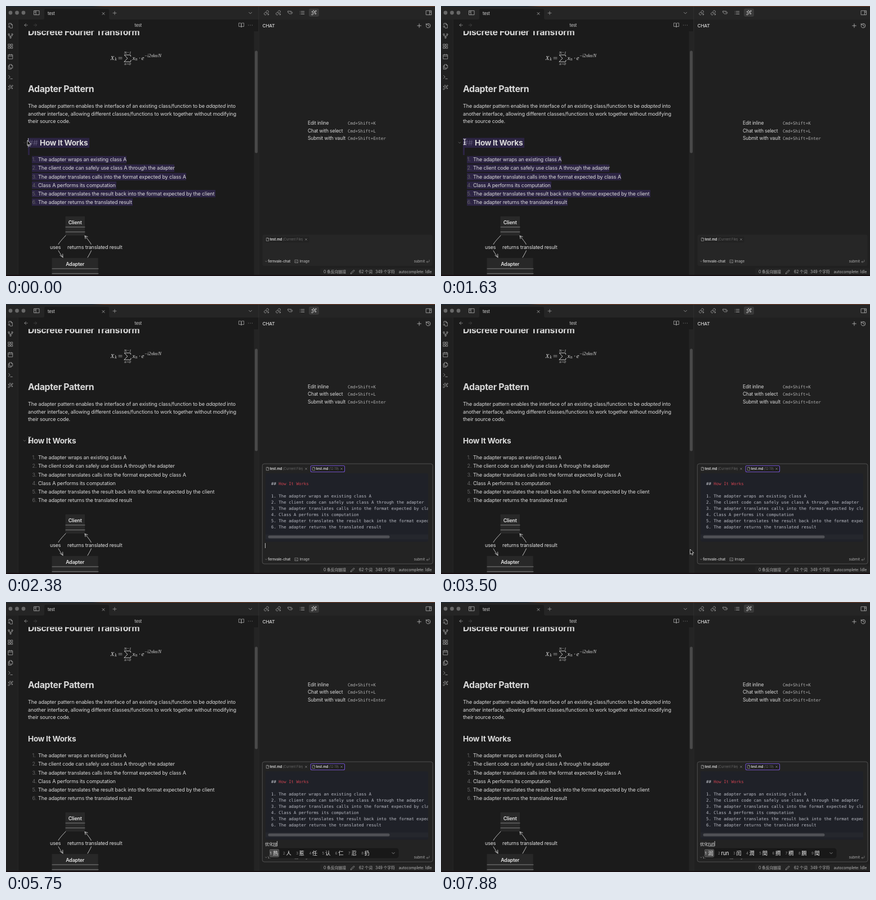
Animation, 762 px wide and 480 px high, one loop 8 s. Source, as an HTML page:

```html
<!DOCTYPE html>
<html lang="zh-CN">
<head>
<meta charset="utf-8">
<style>
html, body { margin: 0; width: 762px; height: 480px; overflow: hidden; background: #1b1b1b; }
svg { display: block; }
text { font-family: Inter, "Noto Sans CJK SC", "Noto Sans CJK", sans-serif; letter-spacing: -.0155em; white-space: pre; }
.h { font-weight: 700; letter-spacing: -.02em; }
.b { font-weight: 600; }
.w { font-weight: 500; }
.m { font-family: "DejaVu Sans Mono", monospace; letter-spacing: 0; }
.s { font-family: "Liberation Serif", serif; font-style: italic; letter-spacing: 0; }
.c { text-anchor: middle; }
.i { fill: none; stroke-linecap: round; stroke-linejoin: round; }
</style>
</head>
<body>
<svg id="stage" width="762" height="480" viewBox="0 0 762 480"></svg>
<script>
const ink = '#dadada';
const text = (s, x, y, size, fill = ink, cls = '', id = '') =>
  `<text id="${id}" x="${x}" y="${y}" font-size="${size}" fill="${fill}" class="${cls}">${s}</text>`;
const rect = (x, y, w, h, fill, more = '') =>
  `<rect x="${x}" y="${y}" width="${w}" height="${h}" fill="${fill}" ${more}/>`;
const line = (d, color = '#bbb', width = 1) => `<path class="i" d="${d}" stroke="${color}" stroke-width="${width}"/>`;
const group = (id, body) => `<g id="${id}">${body}</g>`;

// Icons live on a 24 unit grid and are placed by their centre.
const icons = {
  link: 'M10 13a5 5 0 0 0 7.5.5l3-3a5 5 0 0 0-7-7l-1.7 1.7M14 11a5 5 0 0 0-7.5-.5l-3 3a5 5 0 0 0 7 7l1.7-1.7M17 19h5M20 16l2 3-2 3',
  tags: 'M2 5h8l7 7-6 6-9-7zM13 5h2l7 7-6 6M6 9h.01',
  list: 'M8 6h13M8 12h13M8 18h13M3 6h.01M3 12h.01M3 18h.01',
  wand: 'M21.6 3.6l-1.2-1.2a1.2 1.2 0 0 0-1.8 0L2.4 18.6a1.2 1.2 0 0 0 0 1.8l1.2 1.2a1.2 1.2 0 0 0 1.8 0L21.6 5.4a1.2 1.2 0 0 0 0-1.8M14 7l3 3M5 6v4M19 14v4M10 2v2M7 8H3M21 16h-4M11 3H9',
  down: 'M6 9l6 6 6-6',
  close: 'M18 6 6 18M6 6l12 12',
  plus: 'M12 4v16M4 12h16',
  left: 'M19 12H5M12 19l-7-7 7-7',
  right: 'M5 12h14M12 5l7 7-7 7',
  book: 'M2 3h6a4 4 0 0 1 4 4v14a3 3 0 0 0-3-3H2zM22 3h-6a4 4 0 0 0-4 4v14a3 3 0 0 1 3-3h7z',
  dots: 'M12 12h.01M20 12h.01M4 12h.01',
  history: 'M3 12a9 9 0 1 0 9-9 9.7 9.7 0 0 0-6.7 2.7L3 8M3 3v5h5M12 7v5l4 2',
  panel: 'M2 4h20v16H2zM9 4v16M5 8h1M5 11h1',
  panelRight: 'M2 4h20v16H2zM15 4v16M18 8h1M18 11h1',
  find: 'M5 9V2h9l6 6v14h-9M14 2v6h6M9 16a3 3 0 1 0-6 0 3 3 0 1 0 6 0M8 18l3 3',
  fork: 'M8 5a3 3 0 1 0-6 0 3 3 0 1 0 6 0M22 5a3 3 0 1 0-6 0 3 3 0 1 0 6 0M15 19a3 3 0 1 0-6 0 3 3 0 1 0 6 0M5 8v4h14V8M12 12v4',
  grid: 'M3 3h7v7H3zM14 3h7v7h-7zM14 14h7v7h-7zM3 14h7v7H3z',
  calendar: 'M3 4h18v18H3zM16 2v4M8 2v4M3 10h18',
  copy: 'M8 2h8l5 5v10H8zM16 2v5h5M8 7H3v15h12v-5',
  terminal: 'M4 17l6-6-6-6M12 19h8',
  pencil: 'M17 3a2.8 2.8 0 1 1 4 4L7.5 20.5 2 22l1.5-5.5z',
  enter: 'M9 10l-5 5 5 5M20 4v7a4 4 0 0 1-4 4H4',
  image: 'M3 3h18v18H3zM3 17l6-6 10 10M16 8h.01',
  file: 'M15 2H4v20h16V7zM14 2v6h6'
};
const icon = (name, x, y, size = 10, color = '#a0a0a0', width = 2) =>
  `<g transform="translate(${x - size / 2} ${y - size / 2}) scale(${size / 24})">${line(icons[name], color, width)}</g>`;

const main = '#1b1b1b', side = '#202020';
const steps = [
  'The adapter wraps an existing class A',
  'The client code can safely use class A through the adapter',
  'The adapter translates calls into the format expected by class A',
  'Class A performs its computation',
  'The adapter translates the result back into the format expected by the client',
  'The adapter returns the translated result'
];
const stepEnds = [214, 299, 320, 196, 372, 225];
const stepY = i => 276.4 + i * 15.08;

const frameParts = () =>
  rect(0, 0, 762, 480, main) + rect(0, 0, 762, 24, '#252525') +
  rect(0, 24, 21, 456, side) + rect(449, 24, 313, 456, side) +
  rect(21, 24, .6, 456, '#303030') + rect(448.5, 0, .8, 480, '#343434') +
  `<path d="M65 24q3 0 3-3V8q0-3 3-3h109q3 0 3 3v13q0 3 3 3z" fill="${main}"/>` +
  rect(538, 4.5, 18, 14.5, '#393939', 'rx="3"') +
  [8, 19.5, 31].map(x => `<circle cx="${x}" cy="12" r="3.4" fill="#686868"/>`).join('') +
  icon('panel', 54.5, 12, 11) + icon('close', 173, 13.5, 8, '#ccc') + icon('plus', 193, 12.5, 9) +
  icon('down', 434, 12.5, 10) + icon('link', 462.5, 12) + icon('link', 483.5, 12) + icon('tags', 505, 12) +
  icon('list', 526, 12) + icon('wand', 547, 12, 10, '#ddd') + icon('panelRight', 751, 12, 11) +
  text('test', 74, 16.3, 7.5) +
  ['find', 'fork', 'grid', 'calendar', 'copy', 'terminal', 'wand'].map((n, i) => icon(n, 8, 35 + i * 18.3)).join('') +
  icon('left', 35.5, 34, 9) + icon('right', 52, 34, 9, '#484848') + text('test', 234.8, 36.6, 7.6, '#ccc', 'c') +
  icon('book', 418, 34) + icon('dots', 434, 34, 10, '#a0a0a0', 2.6) +
  rect(440.5, 45, 8, 435, '#242424') + rect(442, 79.5, 5, 182, '#494949', 'rx="2.5"') +
  text('CHAT', 455.5, 38.3, 8.2, ink, 'w') + icon('plus', 734, 35, 10, '#bbb') + icon('history', 750, 35, 10, '#bbb');

const formula = () =>
  text('X', 185.5, 95.5, 11, ink, 's') + text('k', 193.3, 97.4, 7.3, ink, 's') +
  line('M200 91.4h6M200 93.8h6', ink, .6) +
  line('M221.6 89.5 221 87h-11l5.8 6-6 6.2H221.2l.8-2.8', ink, .9) +
  text('N−1', 216, 84.7, 6.9, ink, 's c') + text('n=0', 216, 105, 6.9, ink, 's c') +
  text('x', 224.5, 95.5, 11, ink, 's') + text('n', 229.6, 97.4, 7.3, ink, 's') +
  text('·', 236, 95.5, 11, ink, 's') + text('e', 240.6, 95.5, 11, ink, 's') +
  text('−i2πkn/N', 245.8, 91.3, 7.9, ink, 's');

const diagram = () =>
  rect(105.5, 374, 34.5, 34, '#282828') + rect(81.5, 448, 82, 32, '#282828') +
  line('M106 393h34M106 401.7h34M82 467h82M82 475.7h82', '#a8a8a8', .7) +
  line('M106 408C87.5 428 87.5 428 101 447M96 443.3l5 3.7-.3-6M145 447C156 428 156 428 140 408.5M145 410.2l-5-1.7 1 5.2', '#d0d0d0', .9) +
  rect(78, 424, 20, 10.5, main) + rect(108, 424, 100, 10.5, main) +
  text('Client', 122.7, 388.2, 8.8, '#e4e4e4', 'b c') + text('Adapter', 122.7, 462.4, 8.8, '#e4e4e4', 'b c') +
  text('uses', 87.7, 432.2, 8.95, '#e4e4e4', 'c') + text('returns translated result', 157.8, 432.2, 8.95, '#e4e4e4', 'c');

const selection = () => {
  const purple = '#2c2443';
  return rect(39, 234.5, 109, 17.5, purple) + rect(39, 252, 3, 13, purple) +
    stepEnds.map((x, i) => rect(46, stepY(i) - 9.7, x - 46, 13, purple)).join('') +
    text('##', 39.5, 248.2, 13.6, '#5d5675');
};

const note = () =>
  `<g clip-path="url(#page)">${text('Discrete Fourier Transform', 39, 52.3, 15.75, ink, 'h')}</g>` +
  formula() + text('Adapter Pattern', 39, 153.4, 15.8, ink, 'h') +
  text('The adapter pattern enables the interface of an existing class/function to be <tspan font-style="italic">adapted</tspan> into', 39, 181.2, 9.05) +
  text('another interface, allowing different classes/functions to work together without modifying', 39, 194.8, 9.05) +
  text('their source code.', 39, 208.3, 9.05) +
  group('selection', selection()) + text('How It Works', 39, 248.2, 13.65, ink, 'h', 'title') +
  steps.map((s, i) => text(i + 1 + '.', 46.5, stepY(i), 9.05, '#626262') + text(s, 57, stepY(i), 9.05)).join('') +
  group('fold', icon('down', 33, 243, 8, '#777')) + diagram();

const chip = (x, y, label) =>
  icon('file', x + 5.5, y, 6.5, '#ccc') + text('test.md', x + 9.5, y + 2.2, 6.1, '#ddd', 'b') +
  text(label, x + 32.5, y + 2.2, 6, '#666');

const shortcuts = () =>
  [['Edit inline', 'K'], ['Chat with select', 'L'], ['Submit with vault', 'Enter']].map(([name, key], i) =>
    text(name, 536, 211 + i * 13.5, 8.5) + text('Cmd+Shift+' + key, 607, 211 + i * 13.5, 7.5, '#b0b0b0', 'm')).join('');

const card = () =>
  rect(455.3, 284, 302.7, 178, '#232323', 'rx="3.5" stroke="#565656" stroke-width=".9"') +
  rect(461, 301, 289, 121.5, '#1f2128', 'rx="2"') +
  rect(541.2, 287.5, 60.3, 11, '#1d1d1d', 'rx="2" stroke="#6f50c8" stroke-width="1.1"') +
  chip(459, 293, '(Current File)') + icon('close', 533, 293, 6, '#aaa') +
  chip(541, 293, '(12:19)') + icon('close', 596, 293, 6, '#aaa') +
  `<g clip-path="url(#code)">${text('## <tspan fill="#cb4350">How It Works</tspan>', 471, 321.6, 7.4, '#c2c4cc', 'm')}` +
  steps.map((s, i) => text(`${i + 1}. ${s}`, 471, 343.7 + i * 11.07, 7.4, '#b9bbc4', 'm')).join('') + '</g>' +
  rect(461, 409.5, 289, 9, '#25272d') + rect(465.5, 411.5, 216, 5, '#505156', 'rx="2.5"');

const emptyCard = () =>
  rect(455.5, 406.5, 302, 55.5, '#262626', 'rx="3.5"') +
  rect(459.5, 410, 79, 10.5, '#222', 'rx="2"') + chip(459, 415, '(Current File)') + icon('close', 533, 415, 6, '#aaa');

const footer = () =>
  icon('down', 462, 454, 6) + text('fernvale-chat', 465.2, 456.2, 6.3, '#bbb', 'b') +
  icon('image', 516, 454, 7) + text('Image', 521.5, 456.2, 6.2, '#bbb') +
  text('submit', 724.5, 456.2, 6.3, '#aaa') + icon('enter', 749.5, 454, 7) +
  rect(558, 466, 204, 14, '#242424', 'rx="3"') +
  text('0 条反向链接', 564, 475.4, 6.9, '#b4b4b4') + icon('pencil', 615.5, 472.8, 8, '#b4b4b4') +
  text('62 个词', 627, 475.4, 6.9, '#b4b4b4') + text('349 个字符', 656, 475.4, 6.9, '#b4b4b4') +
  text('autocomplete: Idle', 697.5, 475.4, 6.95, '#b4b4b4');

const $ = id => document.getElementById(id);
$('stage').innerHTML = `<defs>
  <clipPath id="page"><rect y="44.5" width="440" height="436"/></clipPath>
  <clipPath id="code"><rect x="461" y="301" width="288.5" height="122"/></clipPath>
  <linearGradient id="edge"><stop offset=".2" stop-color="#23303f"/><stop offset=".23" stop-color="#80482a"/>
  <stop offset=".8" stop-color="#74402a"/></linearGradient></defs>` +
  frameParts() + note() + group('hints', shortcuts()) + group('empty', emptyCard()) + group('card', card()) + footer() +
  rect(0, 0, 762, 1, 'url(#edge)') + rect(0, 478, 762, 2, '#170f12') +
  rect(39, 235, .8, 16, '#ddd', 'id="noteCaret"') +
  text('', 460, 432.7, 7.4, '#ddd', '', 'input') + rect(460, 425, .8, 9, '#ddd', 'id="caret"') +
  group('ime', '') +
  group('arrow', '<path d="M0 0v9l2.1-1.9 1.5 3.2 1.5-.7-1.4-3.1h2.8z" fill="#000" stroke="#eee" stroke-width=".8"/>') +
  group('beam', line('M-2-5Q0-5 0-3.3V3.3Q0 5 2 5M2-5Q0-5 0-3.3M0 3.3Q0 5-2 5M-1 1h2', '#eee', 1.1));

// Each key press: time, composed pinyin, candidates.
const hu = '油壶 幼虎 优弧 幼狐 有户 油乎乎', ren = '人 任 忍 仁 认 刃 韧 纫', r = '人 让 如 日 然 入 热 任';
const keys = [
  [2000, '', ''],
  [3880, 'y', '有 也 一 又 要 以 用 元'],
  [4000, 'yo', '哟 有 又 由 友 油 右 优'],
  [4130, 'you', '有 又 由 友 右 油 游 幼'],
  [4630, 'you h', '有好 有和 友好 油画 优化 有会 有花 有话'],
  [4750, 'you hu', hu],
  [4880, 'you hua', '优化 油画 有话 有花 右滑 油滑'],
  [5130, '', ''],
  [5630, 'r', r],
  [5750, 're', '热 人 惹 任 认 仁 忍 扔'],
  [5880, 'ren', ren],
  [6130, 'ren s', '人 人生 任 仁 忍 认 刃'],
  [6250, 'ren se', '人色 仁色 人 忍 任 仁 认 刃'],
  [6880, 'ren s', '人 人生 任 仁 忍 认 刃'],
  [7000, 'ren', ren],
  [7130, 're', '热 人 惹 任 认 仁 忍 扔'],
  [7250, 'r', r],
  [7630, 'ru', '如 入 乳 汝 儒 辱 茹 褥'],
  [7750, 'run', '润 run 闰 潤 閏 撋 橍 膶 閠']
];

function drawIme(words, left) {
  if (!words) return '';
  const size = 9.3;
  let x = left + 2.5, body = '';
  words.split(' ').forEach((word, i) => {
    const width = word === 'run' ? 13 : word.length * size;
    if (!i) body += rect(x - 1, 439, width + 8.6, 15, '#4b4b4b', 'rx="3"');
    body += text(i + 1, x + .3, 449.2, 6.2, i ? '#8a8a8a' : '#eee') + text(word, x + 5.7, 449.9, size, '#eee');
    x += width + 13.9;
  });
  const width = Math.max(232, x - left + 22);
  return rect(left, 437, width, 19, '#181818', 'rx="5" stroke="#2b2b2b" stroke-width=".6"') + body +
    icon('down', left + width - 10, 446.5, 9, '#aaa');
}

const ease = p => (p = Math.min(1, Math.max(0, p)), p * p * (3 - 2 * p));
const show = (id, on) => $(id).setAttribute('visibility', on ? 'visible' : 'hidden');
let lastKey;

function draw(t) {
  const added = t >= 1880;
  show('selection', !added);
  $('title').setAttribute('x', added ? 39 : 60);
  show('empty', !added);
  show('card', added);
  $('hints').setAttribute('transform', `translate(0 ${added ? -61.3 : 0})`);
  show('noteCaret', !added && (t + 200) % 1200 < 600);

  const near = ease((t - 130) / 750), far = ease((t - 2750) / 750);
  const x = 38 + 4 * near + 400.5 * far, y = 239 + 2.5 * near + 194.5 * far;
  const beam = t >= 500 && far < .98;
  show('fold', far < .02);
  $('fold').setAttribute('opacity', t < 130 ? .45 : 1);
  for (const id of ['arrow', 'beam']) $(id).setAttribute('transform', `translate(${x} ${y})`);
  show('beam', beam);
  show('arrow', !beam && t < 3880);

  const key = keys.findLast(k => t >= k[0]);
  if (key !== lastKey) {
    lastKey = key;
    const done = t >= 5130 ? '优化' : '';
    $('input').innerHTML = key ? `${done}<tspan text-decoration="underline">${key[1]}</tspan>` : '';
    $('ime').innerHTML = key ? drawIme(key[2], done ? 466 : 453) : '';
    $('caret').setAttribute('x', 460 + $('input').getComputedTextLength());
  }
  show('caret', key && (t - key[0]) % 1000 < 500);
}

const start = performance.now();
(function tick() {
  draw((performance.now() - start) % 8000);
  requestAnimationFrame(tick);
})();
</script>
</body>
</html>
```
